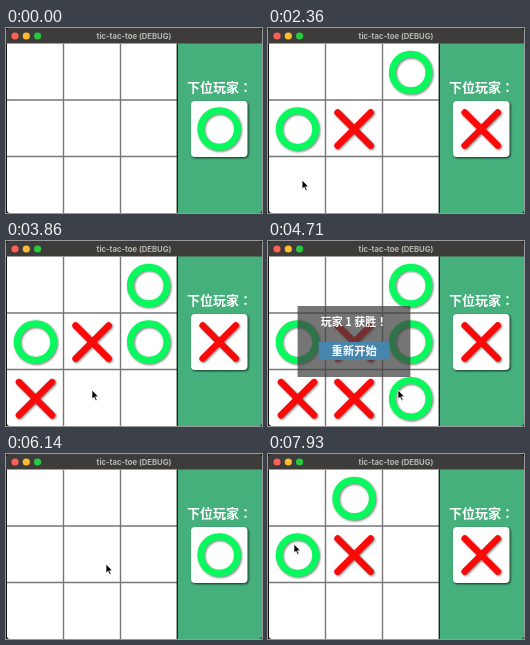
An HTML page that plays this animation: 256 by 185 pixels, repeating every 8000 ms.

```html
<!DOCTYPE html>
<html lang="zh">
<head>
<meta charset="utf-8">
<title>tic-tac-toe</title>
<style>
  html, body { margin: 0; width: 100%; height: 100%; overflow: hidden; background: #111; }
  svg { display: block; width: 256px; height: 185px; }
  text { text-anchor: middle; fill: #fff; }
  .title { font: 700 7.7px Inter, sans-serif; fill: #b9b8b6; }
  .cjk { font-family: "Noto Sans CJK TC", "Noto Sans CJK JP", "Noto Sans CJK SC", sans-serif; font-weight: 700; }
  .grid { stroke: #777; stroke-width: 1.4; }
  .mark { filter: drop-shadow(1.5px 1.5px 1px rgba(0, 0, 0, .5)); }
  .card { filter: drop-shadow(1.5px 1.5px .8px rgba(0, 0, 0, .75)); }
</style>
</head>
<body>
<svg viewBox="0 0 256 185">
  <defs>
    <circle id="O" r="18.3" fill="none" stroke="#08f85e" stroke-width="7"/>
    <path id="X" d="M-16.5-16.5 16.5 16.5M16.5-16.5-16.5 16.5" stroke="#fb0808" stroke-width="6.6" stroke-linecap="round"/>
  </defs>
  <rect width="256" height="185" fill="#111"/>
  <path d="M0 16V4Q0 0 4 0H252Q256 0 256 4V16Z" fill="#3d3c3a"/>
  <circle cx="9" cy="8" r="3.6" fill="#fe5f57"/>
  <circle cx="20.3" cy="8" r="3.6" fill="#febc2e"/>
  <circle cx="31.6" cy="8" r="3.6" fill="#28c840"/>
  <text class="title" x="128" y="10.6">tic-tac-toe (DEBUG)</text>

  <path d="M1 15.6H171V185H4Q1 185 1 182Z" fill="#fff"/>
  <path class="grid" d="M57.5 16V185M114.5 16V185M1 72H171M1 128.5H171"/>
  <path d="M172 15.6H256V182Q256 185 253 185H172Z" fill="#45b07b"/>
  <path d="M171.3 16V185" stroke="#222" stroke-width="1.4"/>

  <text class="cjk" lang="zh-TW" x="213.5" y="63.7" font-size="13">下位玩家：</text>
  <rect class="card" x="185" y="73" width="56.5" height="56" rx="4" fill="#fff"/>
  <g id="marks"></g>

  <g id="dialog">
    <rect x="29.6" y="65" width="112.8" height="71" fill="#404040" fill-opacity=".72"/>
    <text class="cjk" lang="zh-TW" x="86" y="84.5" font-size="11">玩家 1 获胜！</text>
    <rect id="button" x="50.6" y="101" width="71" height="18"/>
    <text class="cjk" x="86.2" y="114.2" font-size="11.3">重新开始</text>
  </g>
  <path id="cursor" d="M0 0V9L2.1 7.2 3.6 10.6 5.1 9.9 3.6 6.7H6.4Z"
    fill="#000" stroke="#fff" stroke-width=".7"/>
</svg>
<script>
const LOOP = 8000, TICK = 1000 / 14, CELL = 56.6, TOP = 16;
const $ = id => document.getElementById(id);

// the player's clicks: time and pointer position
const clicks = [
  [860, 143, 56], [1500, 73, 102], [2140, 36, 116], [2710, 34, 154],
  [3360, 138, 115], [4140, 86, 149], [4710, 130, 149], [6140, 100, 110],
  [6930, 87, 42], [7360, 70, 105], [7930, 26, 90]
].map(([at, x, y]) => ({ at, x, y }));
const enter = { at: 210, x: 161, y: 148 };

function addMark(x, y) {
  const g = document.createElementNS('http://www.w3.org/2000/svg', 'g');
  g.setAttribute('class', 'mark');
  g.setAttribute('transform', `translate(${x} ${y})`);
  g.innerHTML = '<use/>';
  return $('marks').appendChild(g).firstChild;
}
const show = (el, on) => { el.style.display = on ? '' : 'none'; };
const setMark = (el, kind) => el.setAttribute('href', '#' + kind);

const emptyBoard = () => Array(9).fill('');
const cells = emptyBoard().map((_, i) =>
  addMark(29.5 + i % 3 * CELL, 44.5 + Math.floor(i / 3) * CELL));
const next = addMark(213.2, 101);

function hasWinner(b) {
  const same = (start, step) =>
    b[start] && b[start] === b[start + step] && b[start] === b[start + 2 * step];
  return [0, 1, 2].some(i => same(i * 3, 1) || same(i, 3)) || same(0, 4) || same(2, 2);
}

// replay every click up to t; a click on a finished game restarts it
function play(t) {
  let board = emptyBoard(), turn = 'O', won = false;
  for (const { at, x, y } of clicks) {
    if (at > t) break;
    if (won) {
      board = emptyBoard();
      turn = 'O';
      won = false;
    } else {
      board[Math.floor(x / CELL) + 3 * Math.floor((y - TOP) / CELL)] = turn;
      turn = turn === 'O' ? 'X' : 'O';
      won = hasWinner(board);
    }
  }
  return { board, turn, won };
}

// the pointer glides to the next click early in each pause, then rests
function pointer(t) {
  const i = clicks.findIndex(c => c.at > t);
  if (i < 0) return clicks[clicks.length - 1];
  const a = clicks[i - 1] || enter, b = clicks[i];
  const p = Math.min(1, Math.max(0, ((t - a.at) / (b.at - a.at) - .1) / .45));
  const e = 1 - (1 - p) ** 3;
  return { x: a.x + (b.x - a.x) * e, y: a.y + (b.y - a.y) * e };
}

function render(t) {
  const { board, turn, won } = play(t);
  cells.forEach((el, i) => setMark(el, board[i]));
  setMark(next, turn);
  show($('dialog'), won);

  const { x, y } = pointer(Math.floor((t + 5) / TICK) * TICK);
  show($('cursor'), t >= enter.at);
  $('cursor').setAttribute('transform', `translate(${x} ${y})`);
  const hover = Math.abs(x - 86) < 36 && Math.abs(y - 110) < 9;
  $('button').setAttribute('fill', hover ? '#60a5cc' : '#4685ad');
}

function tick() {
  render(performance.now() % LOOP);
  requestAnimationFrame(tick);
}
tick();
</script>
</body>
</html>
```
